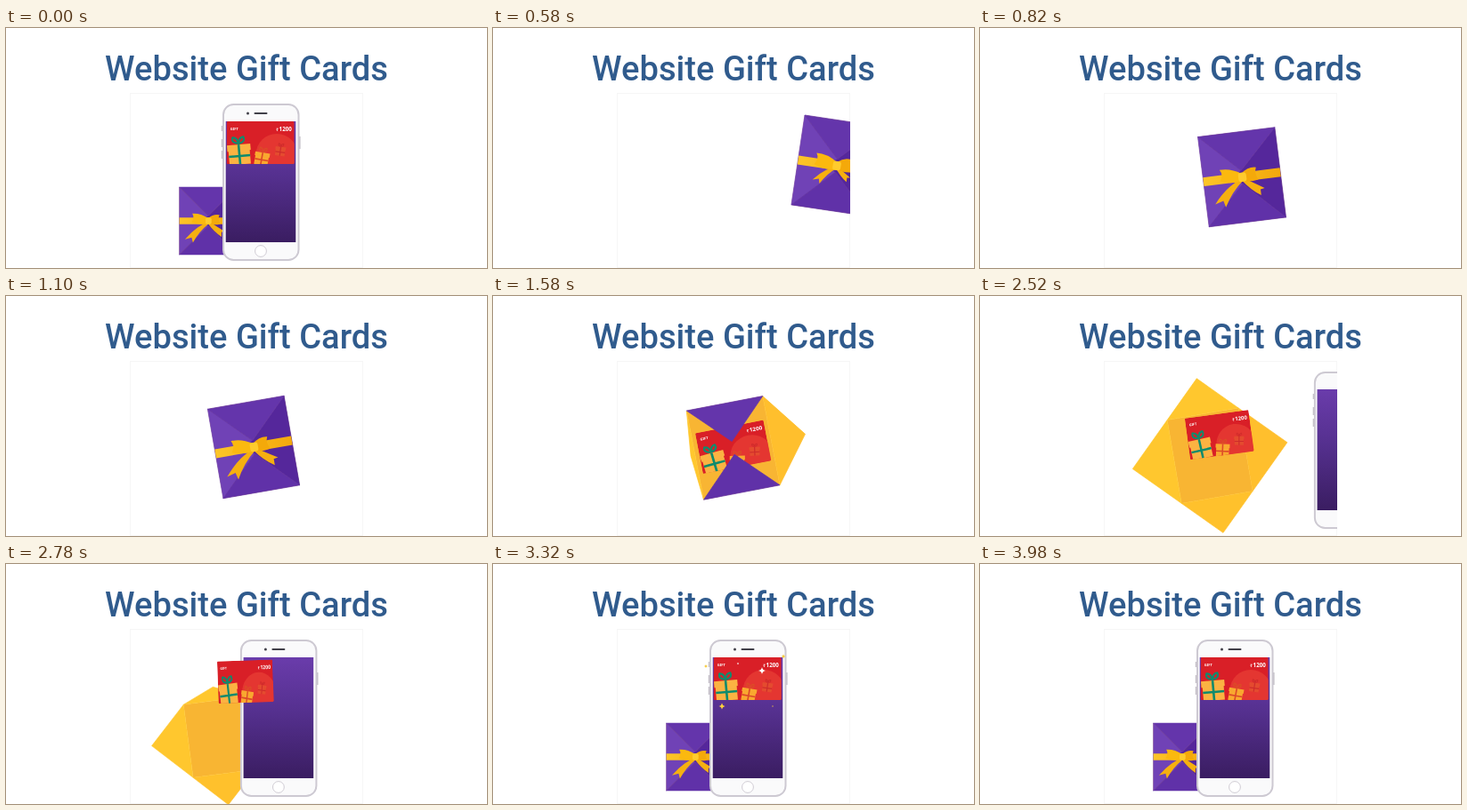
Animation, 540 px wide and 270 px high, one loop 4020 ms. Source, as an HTML page:

```html
<!DOCTYPE html>
<html lang="en">
<head>
<meta charset="utf-8">
<title>Website Gift Cards</title>
<style>
  html, body { margin: 0; width: 100%; height: 100%; overflow: hidden; background: #fff; }
  svg { display: block; width: 100vw; height: 100vh; }
  .title { font: 500 38.1px Roboto, sans-serif; fill: #305b8d; text-anchor: middle; }
  .small { font-family: "Noto Sans", sans-serif; font-weight: 700; fill: #fff; }
</style>
</head>
<body>
<svg viewBox="0 0 540 270">
  <defs>
    <linearGradient id="screen" x2="0" y2="1">
      <stop stop-color="#6a3cab"/><stop offset=".45" stop-color="#55308f"/><stop offset="1" stop-color="#3a1d61"/>
    </linearGradient>
    <linearGradient id="gold"><stop stop-color="#fcc528"/><stop offset="1" stop-color="#f3a90c"/></linearGradient>
    <clipPath id="window"><rect x="139" y="73" width="262" height="197"/></clipPath>
    <clipPath id="cardEdge"><rect x="-37.5" y="-24" width="75" height="48" rx="1.5"/></clipPath>
    <g id="present">
      <rect x="-10" y="-4" width="20" height="15"/>
      <rect x="-11" y="-8" width="22" height="6"/>
      <g fill="none" stroke="var(--tie)" stroke-width="2.2">
        <path d="M0-8V11M-10 3H10"/>
        <path d="M0-9Q-7-10-5-15Q-1-15 0-9Q1-15 5-15Q7-10 0-9" stroke-width="1.8"/>
      </g>
    </g>
    <path id="star" d="M0-1Q.15-.15 1 0Q.15.15 0 1Q-.15.15-1 0Q-.15-.15 0-1"/>
  </defs>

  <text class="title" x="270" y="59">Website Gift Cards</text>
  <rect x="139.5" y="73.5" width="261" height="196" fill="none" stroke="#f6f6f6"/>

  <g clip-path="url(#window)">
    <g id="scene">
      <g id="back"><rect x="-43.5" y="-51" width="87" height="102" fill="#f8b533"/></g>
      <g id="inside"></g>
      <g id="front">
        <g id="flaps" stroke-width=".7" stroke-linejoin="bevel"></g>
        <g id="ribbon">
          <rect x="-43.5" y="-5" width="87" height="10" fill="url(#gold)"/>
          <g id="bow" fill="#f6b010">
            <g id="tails">
              <path d="M-3 2L-16 10Q-26 17-35 28L-25 25L-23 33Q-14 16 1 4Z"/>
              <path d="M-1 3L3 2Q12 8 25 16L20 17L20 24Q8 16-1 3Z"/>
            </g>
            <path d="M0-4Q-12-12-24-11Q-20-5-25 2Q-12 7 0 4Z" fill="#fbb90f"/>
            <path d="M0-4Q8-11 17-9Q14-3 18 5Q8 7 0 4Z" fill="#f4a90a"/>
            <rect x="-4" y="-5" width="9" height="10" rx="2.5" fill="#ffcb2d"/>
          </g>
        </g>
      </g>
      <g id="phone">
        <path d="M242.6 110v6M242.6 125v9M242.6 138v9M329.8 122v14" stroke="#c4c0c8" stroke-width="1.6"/>
        <rect x="244" y="86" width="84.5" height="175" rx="11.5" fill="#fafafb" stroke="#cdc9d2" stroke-width="2"/>
        <rect x="246.7" y="105" width="78.6" height="136" fill="url(#screen)"/>
        <circle cx="271.5" cy="96" r="1.5" fill="#414049"/>
        <path d="M279.5 96h13" stroke="#414049" stroke-width="2" stroke-linecap="round"/>
        <circle cx="286" cy="251" r="6.4" fill="#fff" stroke="#d0ccd4"/>
      </g>
      <g id="above">
        <g id="card"><g clip-path="url(#cardEdge)">
          <rect x="-37.5" y="-24" width="75" height="48" fill="#d91f27"/>
          <circle cx="18" cy="13" r="23" fill="#e83e34" opacity=".75"/>
          <use href="#present" transform="translate(22 9) rotate(8) scale(.53)" fill="#e4532f" style="--tie:#c8282a" opacity=".75"/>
          <use href="#present" transform="translate(1.5 17) rotate(10) scale(.75)" fill="#f9a82f" style="--tie:#dd4a28"/>
          <use href="#present" transform="translate(-23.5 11.5) rotate(-5) scale(1.18)" fill="#fbb342" style="--tie:#0f8b6d"/>
          <text class="small" x="-33.5" y="-14.5" font-size="4">GIFT</text>
          <text class="small" x="20" y="-13.5" font-size="4.6" text-anchor="end">₹</text>
          <text class="small" x="34.8" y="-13.5" font-size="6.2" text-anchor="end">1200</text>
        </g></g>
      </g>
      <g id="stars"></g>
    </g>
  </g>
</svg>
<script>
const LOOP = 4020;
const part = Object.fromEntries(
  ['scene', 'back', 'inside', 'front', 'flaps', 'ribbon', 'bow', 'tails', 'phone', 'above', 'card', 'stars']
    .map(id => [id, document.getElementById(id)]));

const ramp = (t, a, b) => Math.min(1, Math.max(0, (t - a) / (b - a)));
const smooth = p => p * p * (3 - 2 * p);
const easeIn = p => p ** 1.7;
const easeOut = p => 1 - (1 - p) ** 2;
const cubicOut = p => 1 - (1 - p) ** 3;
const mix = (a, b, p) => a.map((v, i) => v + (b[i] - v) * p);
const set = (el, attrs) => { for (const k in attrs) el.setAttribute(k, attrs[k]); };
const place = ([x, y, sx, r], sy = sx) => `translate(${x} ${y}) rotate(${r}) scale(${sx} ${sy})`;

function add(parent, tag, attrs) {
  const el = document.createElementNS('http://www.w3.org/2000/svg', tag);
  set(el, attrs);
  return parent.appendChild(el);
}

// Each flap hinges on one side; fold runs from 1 (closed) to -1 (open).
const HALF_W = 43.5, HALF_H = 51, REACH = 94.5;
const flaps = [
  { dx: -1, dy: 0, open: [1400, 1740], close: [2830, 3030], outside: '#7042b6', inside: '#ffc72e' },
  { dx: 1, dy: 0, open: [1330, 1650], close: [2780, 2980], outside: '#55279b', inside: '#ffbf2d' },
  { dx: 0, dy: 1, open: [1680, 1980], close: [2880, 3080], outside: '#6031a8', inside: '#ffc12c' },
  { dx: 0, dy: -1, open: [1640, 1920], close: [2690, 2950], outside: '#6435ab', inside: '#ffc72e' }
].map(f => ({ ...f, el: add(part.flaps, 'path', {}) }));

const stars = [
  [302, 120, 4, 3320, '#fff'], [257, 160, 3.5, 3320, '#ffd23c'],
  [239, 115, 2, 3350, '#f5c936'], [326, 104, 2.5, 3300, '#f5c936'],
  [275, 112, 2.5, 3500, '#fff'], [314, 160, 3, 3520, '#ffd23c']
].map(([x, y, r, peak, fill]) => ({ x, y, r, peak, el: add(part.stars, 'use', { href: '#star', fill }) }));

// Gift poses: x, y, scale, angle
const REST = [227, 217, .745, 0], ENTER = [470, 143, 1, 23],
  CENTRE = [278, 170, 1, -9.9], OPENED = [268.7, 171, 1, -11], LEAVING = [239.8, 194.5, .813, -7.5];

function giftPose(t) {
  if (t < 420) return REST;
  if (t < 1100) return mix(ENTER, CENTRE, cubicOut(ramp(t, 472, 1092)));
  if (t < 2200) return mix(CENTRE, OPENED, smooth(ramp(t, 1100, 1700)));
  if (t < 2780) return mix(OPENED, LEAVING, easeIn(ramp(t, 2200, 2780)));
  return mix(LEAVING, REST, easeOut(ramp(t, 2780, 3120)));
}

// Card poses: x, y, width, angle, height
const HELD = [268.7, 169.8, 78, -11, 46.5], LIFTED = [268.7, 132.3, 62, -2, 47.5], LANDED = [285.7, 129, 76, 0, 48];

function cardPose(t, [giftX]) {
  if (t < 420) return LANDED;
  if (t < 2200) return [giftX, ...HELD.slice(1)];
  if (t < 2780) return mix(HELD, LIFTED, easeIn(ramp(t, 2200, 2780)));
  return mix(LIFTED, LANDED, easeOut(ramp(t, 2780, 3060)));
}

function drawFlap(f, t) {
  const fold = 1 - 2 * (smooth(ramp(t, ...f.open)) - smooth(ramp(t, ...f.close)));
  const half = f.dx ? HALF_W : HALF_H;
  const tip = half - fold * (REACH - half);
  const d = f.dx
    ? `M${f.dx * HALF_W} ${-HALF_H}V${HALF_H}L${f.dx * tip} 0Z`
    : `M${-HALF_W} ${f.dy * HALF_H}H${HALF_W}L0 ${f.dy * tip}Z`;
  const fill = fold > 0 ? f.outside : f.inside;
  set(f.el, { d, fill, stroke: fill });
}

function draw(t) {
  part.scene.style.opacity = t < 420 ? 1 - smooth(ramp(t, 180, 420)) : 1;

  const gift = giftPose(t);
  set(part.back, { transform: place(gift) });
  set(part.front, { transform: place(gift) });
  flaps.forEach(f => drawFlap(f, t));

  const tied = 1 - smooth(ramp(t, 1110, 1340)) + smooth(ramp(t, 3030, 3200));
  part.ribbon.style.opacity = tied;
  set(part.bow, { transform: `scale(${.4 + .6 * tied})` });
  // The tails trail behind while the gift flies in.
  const settled = t < 420 ? 1 : cubicOut(ramp(t, 472, 1092));
  set(part.tails, { transform: `scale(${.45 + .55 * settled})` });

  const away = t < 420 ? 0 : 160 * (1 - ramp(t, 2484, 3077)) ** 3;
  set(part.phone, { transform: `translate(${away} 0)` });

  const [x, y, w, angle, h] = cardPose(t, gift);
  const home = t >= 420 && t < 2180 ? part.inside : part.above;
  if (part.card.parentNode !== home) home.appendChild(part.card);
  set(part.card, { transform: place([x, y, w / 75, angle], h / 48) });
  part.card.style.opacity = t < 420 || t >= 1330 ? 1 : 0;

  for (const s of stars) {
    const phase = Math.min(1, Math.abs(t - s.peak) / 260);
    const size = s.r * Math.cos(phase * Math.PI / 2);
    set(s.el, { transform: `translate(${s.x} ${s.y}) scale(${size})` });
  }
}

const start = performance.now();
function tick() {
  draw((performance.now() - start) % LOOP);
  requestAnimationFrame(tick);
}
draw(0);
requestAnimationFrame(tick);
</script>
</body>
</html>
```
